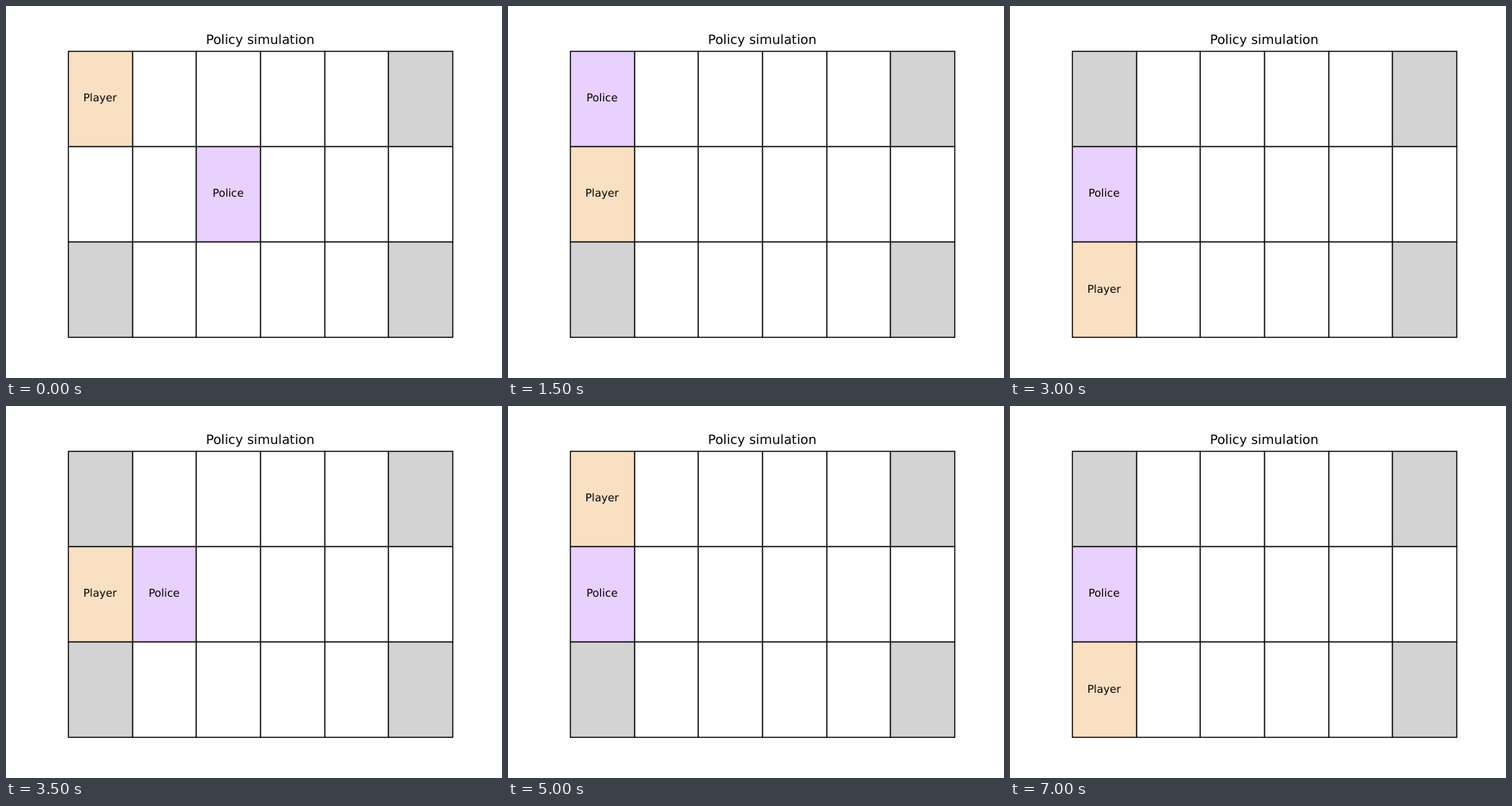
An HTML page for the animation above (7500 ms loop, 640 px wide and 480 px high).

```html
<!DOCTYPE html>
<html lang="en">
<head>
<meta charset="utf-8">
<title>Policy simulation</title>
<style>
  html, body { margin: 0; width: 100%; height: 100%; overflow: hidden; background: #fff; }
  svg { display: block; width: 640px; height: 480px; }
  rect { stroke: #000; stroke-width: 1.389; }
  text {
    font: 13.889px "DejaVu Sans", sans-serif;
    text-anchor: middle;
    text-rendering: geometricPrecision;
  }
  .title { font-size: 16.667px; }
</style>
</head>
<body>
<svg id="stage" viewBox="0 0 640 480">
  <text class="title" x="328" y="49">Policy simulation</text>
</svg>
<script>
const STEP = 500;
const WALL = '#d3d3d3';
const stage = document.getElementById('stage');

// Grid line positions, snapped to pixel centres
const lineX = c => Math.round(80 + c * 248 / 3) + 0.5;
const lineY = r => Math.round(57.6 + r * 123.2) + 0.5;

// One "row,column" pair per step
const route = s => s.split(' ').map(p => p.split('').map(Number));
const actors = [
  { name: 'Player', fill: '#fae0c3',
    path: route('00 00 00 10 20 20 20 10 00 00 00 10 20 20 20') },
  { name: 'Police', fill: '#e8d0ff',
    path: route('12 11 10 00 01 11 10 11 21 11 10 00 01 00 10') }
];

function add(tag, attrs) {
  const el = document.createElementNS('http://www.w3.org/2000/svg', tag);
  for (const k in attrs) el.setAttribute(k, attrs[k]);
  return stage.appendChild(el);
}

const cells = [0, 1, 2].map(r => [0, 1, 2, 3, 4, 5].map(c => add('rect', {
  x: lineX(c), y: lineY(r),
  width: lineX(c + 1) - lineX(c), height: lineY(r + 1) - lineY(r)
})));

for (const a of actors) {
  a.label = add('text', {});
  a.label.textContent = a.name;
}

const isWall = (r, c) => r !== 1 && (c === 5 || (c === 0));

function show(step) {
  cells.forEach((row, r) => row.forEach((cell, c) =>
    cell.setAttribute('fill', isWall(r, c) ? WALL : '#fff')));
  for (const a of actors) {
    const [r, c] = a.path[step];
    cells[r][c].setAttribute('fill', a.fill);
    a.label.setAttribute('x', 80 + (c + 0.5) * 248 / 3);
    a.label.setAttribute('y', [123, 246, 370][r]);
  }
}

const start = performance.now();
let current = -1;
function tick() {
  const elapsed = Math.max(0, performance.now() - start);
  const step = Math.floor(elapsed / STEP) % actors[0].path.length;
  if (step !== current) show(current = step);
  requestAnimationFrame(tick);
}
tick();
</script>
</body>
</html>
```
